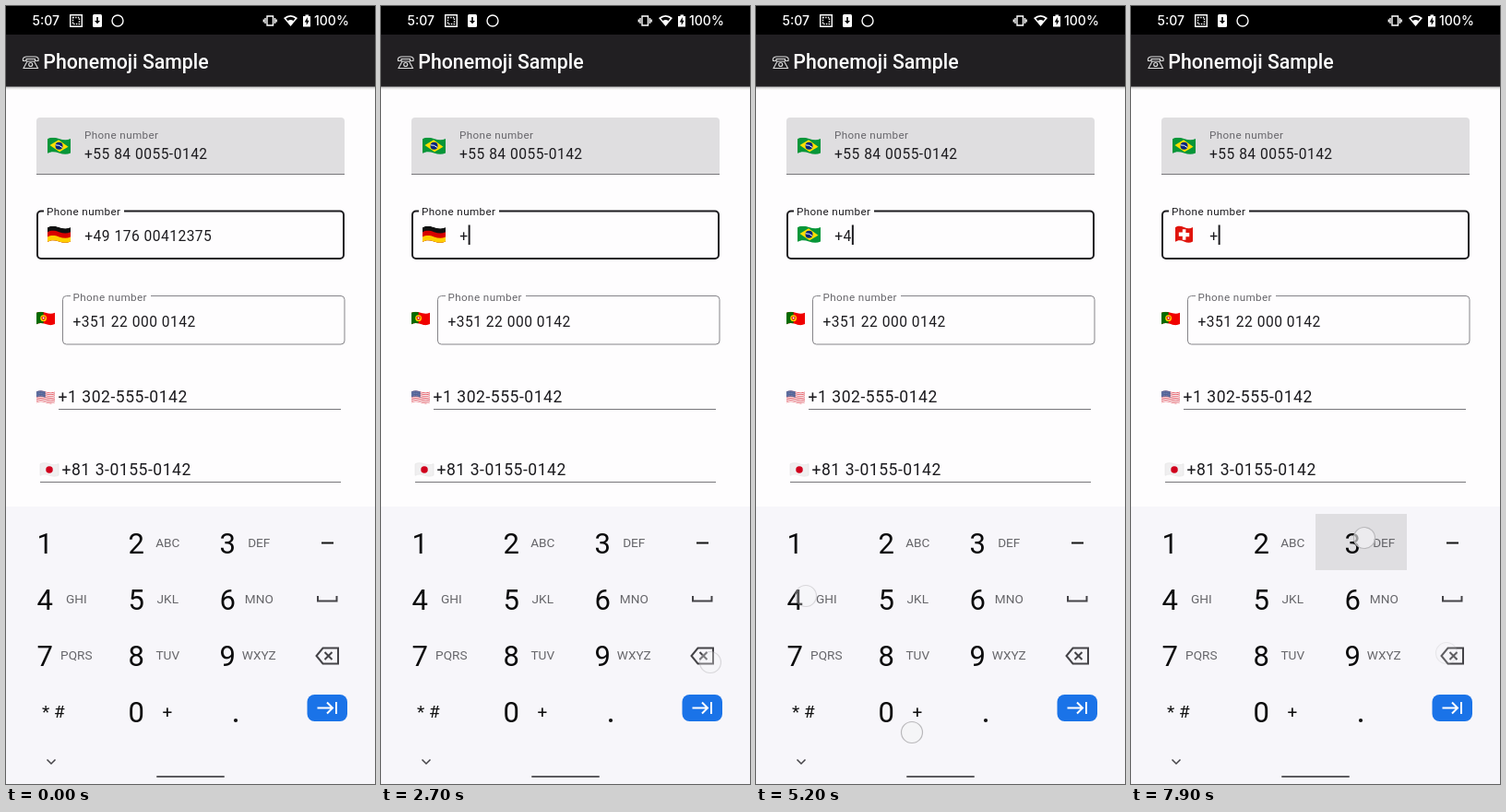
An HTML page for the animation above (8000 ms loop, 400 px wide and 844 px high).

```html
<!DOCTYPE html>
<html lang="en">
<head>
<meta charset="utf-8">
<title>Phonemoji Sample</title>
<style>
html, body { margin: 0; height: 100%; overflow: hidden; background: #fefdfe; }
svg { display: block; width: 400px; height: 844px; font-family: Roboto, sans-serif; fill: #1c1b1f; }
.line { fill: none; stroke: #1c1b1f; }
.status { font: 500 14px Inter, sans-serif; fill: #fff; }
.title { font-size: 21.3px; font-weight: 500; fill: #fff; }
.label { font-size: 11.68px; letter-spacing: .0333em; fill: #66656a; }
.field { font-size: 15.57px; letter-spacing: .03125em; }
.large { font-size: 17.5px; }
.digit { font-size: 31px; text-anchor: middle; fill: #0b0b0c; }
.letters { font-size: 13.6px; text-anchor: middle; fill: #66666a; }
.symbol { font-size: 19px; fill: #111; }
</style>
</head>
<body>
<svg viewBox="0 0 400 844">
  <defs>
    <path id="cloth" d="M0 1.7C4-.6 8 0 12.5 1.5S21 3.4 25 1.5V17C21 19 17 18.6 12.5 17S4 15 0 17.3Z"/>
    <clipPath id="wave"><use href="#cloth"/></clipPath>
    <g id="br" clip-path="url(#wave)">
      <path fill="#079639" d="M0 0H25V20H0Z"/>
      <path fill="#fedf00" d="M2.5 8.6 12 2.8 22.5 10.2 13 15.8Z"/>
      <circle cx="12.5" cy="9.3" r="4" fill="#00247d"/>
      <path class="line" style="stroke:#fff" d="M8.7 8.3Q13 8 16 11"/>
    </g>
    <g id="de" clip-path="url(#wave)">
      <use href="#cloth" fill="#111"/>
      <use href="#cloth" y="5.2" fill="#d80000"/>
      <use href="#cloth" y="10.4" fill="#ffce00"/>
    </g>
    <g id="ro" clip-path="url(#wave)">
      <path fill="#00319c" d="M0 0H9V20H0Z"/>
      <path fill="#ffde00" d="M8.4 0H17V20H8.4Z"/>
      <path fill="#de2110" d="M16.7 0H25V20H16.7Z"/>
    </g>
    <g id="ch" transform="translate(3) scale(.76 1)">
      <use href="#cloth" fill="#e0140c"/>
      <path fill="#fff" d="M10.3 3.8H15V7.4H20V11.8H15V15.3H10.3V11.3H5V7H10.3Z"/>
    </g>
    <g id="pt" clip-path="url(#wave)">
      <path fill="#f00000" d="M0 0H25V20H0Z"/>
      <path fill="#066b00" d="M0 0H9.5V20H0Z"/>
      <circle cx="9.5" cy="9" r="4.2" fill="#ffe000"/>
      <path fill="#e00000" d="M7 6.5H12V9.5Q11.5 11.5 9.5 12Q7.5 11.5 7 9.5Z"/>
      <path fill="#fff" d="M8.4 7.5H10.6V10H8.4Z"/>
    </g>
    <g id="us" clip-path="url(#wave)">
      <use href="#cloth" fill="#e8606a"/>
      <g id="stripes"></g>
      <path fill="#48598f" d="M0 0Q6-1 12 1.5V9.8Q6 7 0 9.2Z"/>
      <path class="line" style="stroke:#c4cbe0" stroke-dasharray="1 1.5" d="M1 3.2Q6 1 11 3.4M1 5.4Q6 3.4 11 5.8M1 7.6Q6 5.6 11 8"/>
    </g>
    <g id="jp">
      <use href="#cloth" fill="#f0eff0" stroke="#ddd" stroke-width=".6"/>
      <circle cx="12.5" cy="9.3" r="4.7" fill="#d0001c"/>
    </g>
    <linearGradient id="shade" x2="0" y2="1"><stop stop-color="#bbb"/><stop offset="1" stop-color="#fefdfe"/></linearGradient>
  </defs>

  <path fill="#fefdfe" d="M0 0H400V844H0Z"/>
  <path fill="url(#shade)" d="M0 87H400V91H0Z"/>
  <path fill="#211f22" d="M0 30H400V87.5H0Z"/>
  <path fill="#000" d="M0 0H400V31H0Z"/>

  <g class="status">
    <text x="28.5" y="21">5:07</text>
    <text x="334" y="21">100%</text>
    <g class="line" style="stroke:#fff" stroke-width="1.4">
      <path d="M69.7 9.7H82.3V22.3H69.7Z"/>
      <path stroke-dasharray="1.4 1.3" d="M72.5 12.5H79.5V19.5H72.5Z"/>
      <circle cx="121" cy="16" r="6"/>
      <path d="M283 11H289.500V21H283ZM281 13V19M291.500 13V19M279.300 14.500V17.500M293.200 14.500V17.500"/>
    </g>
    <path d="M95.500 9H102.500Q104 9 104 10.500V21.500Q104 23 102.500 23H95.500Q94 23 94 21.500V10.500Q94 9 95.500 9Z"/>
    <path fill="#000" d="M98.200 12H99.800V16H102L99 19.300 96 16H98.200Z"/>
    <path d="M301 13Q308.500 7 316 13L308.500 22Z"/>
    <path fill="#000" d="M303.500 13.500Q308.500 10 313.500 13.500L311.500 16Q308.500 14 305.500 16Z"/>
    <path d="M324.500 9.500H328V11H330V22.500H322V11H324.500Z"/>
    <path fill="#000" d="M326.800 12 323.700 17.500H325.700V21L328.600 15.700H326.800Z"/>
  </g>

  <g class="line" style="stroke:#ddd" stroke-width="1.1">
    <path d="M18.500 59.500Q17.500 55.500 22 55H32Q36 55.500 35 59.500H31.500V57.500H22V59.500ZM23 60H30.500L34.500 67.500H19Z"/>
    <circle cx="26.700" cy="63.500" r="2"/>
  </g>
  <text class="title" x="40.300" y="68">Phonemoji Sample</text>

  <path fill="#dfdee0" d="M33 182V125Q33 121 37 121H363Q367 121 367 125V182Z"/>
  <path class="line" style="stroke:#77767a" d="M33 182.500H367M57 437.500H363M37 516.500H363"/>
  <text class="label" x="85" y="144">Phone number</text>
  <text class="field" x="85" y="166">+55 84 0055-0142</text>
  <use href="#br" x="45" y="142.500"/>

  <path class="line" stroke-width="2" d="M41 222.500H38a4 4 0 0 0-4 4V270a4 4 0 0 0 4 4H362a4 4 0 0 0 4-4V226.500a4 4 0 0 0-4-4H128"/>
  <text class="label" x="44" y="227" style="fill:#1c1b1f">Phone number</text>
  <use id="flag" x="45" y="238.500"/>
  <text class="field" id="input" x="85.300" y="255"></text>
  <rect id="caret" y="237.500" width="2" height="21.500"/>

  <path class="line" style="stroke:#858489" d="M70 314.500H65.500a4 4 0 0 0-4 4V363a4 4 0 0 0 4 4H363a4 4 0 0 0 4-4V318.500a4 4 0 0 0-4-4H157"/>
  <text class="label" x="72.500" y="319.500">Phone number</text>
  <text class="field" x="72.500" y="347.500">+351 22 000 0142</text>
  <use href="#pt" transform="translate(33 331.500) scale(.8)"/>

  <text class="field large" x="56.500" y="430">+1 302-555-0142</text>
  <use href="#us" transform="translate(33 417) scale(.8)"/>
  <text class="field large" x="60.500" y="509">+81 3-0155-0142</text>
  <use href="#jp" transform="translate(37 495.500) scale(.8)"/>

  <path fill="#f7f6fa" d="M0 543H400V844H0Z"/>
  <g id="presses" fill="#dfdee1"></g>
  <g id="keys"></g>
  <g class="symbol">
    <text x="39" y="772">* #</text>
    <text x="169.500" y="772">+</text>
    <circle cx="249" cy="775" r="2.100"/>
  </g>
  <g class="line" style="stroke:#444347" stroke-width="2">
    <path stroke="#111" d="M342 582.500H355"/>
    <path d="M338 640V645.500H358.500V640"/>
    <path d="M343.500 696.500H360V713.500H343.500L336.500 705ZM345.500 701 353.500 709M353.500 701 345.500 709"/>
    <path stroke-width="1.500" d="M44.500 817.500 49 822 53.500 817.500"/>
  </g>
  <rect x="326.500" y="747" width="43.500" height="29" rx="8" fill="#1a73e8"/>
  <path class="line" style="stroke:#fff" stroke-width="2" d="M337.500 761.500H353.500M348 755.500 354 761.500 348 767.500M358 755V768"/>
  <rect x="163" y="835" width="74" height="2" rx="1" fill="#5c5b5f"/>
  <g id="touches" fill="#f4f4f5" fill-opacity=".62" stroke="#b9b8bb" stroke-width="1.200"></g>
</svg>
<script>
const byId = id => document.getElementById(id);
const add = (parent, tag, attrs, text = '') => {
  const el = document.createElementNS('http://www.w3.org/2000/svg', tag);
  for (const name in attrs) el.setAttribute(name, attrs[name]);
  el.textContent = text;
  return byId(parent).appendChild(el);
};

for (let i = 0; i < 6; i++) {
  add('stripes', 'path', {
    class: 'line', style: 'stroke:#f6eef0', 'stroke-width': 1.3,
    d: `M0 ${3.6 + i * 2.4}c4-2.3 8-1.7 12.500-.2s8.500 1.900 12.500 0`
  });
}

['', 'ABC', 'DEF', 'GHI', 'JKL', 'MNO', 'PQRS', 'TUV', 'WXYZ'].forEach((letters, i) => {
  const x = 42.3 + i % 3 * 99, y = 593.5 + Math.floor(i / 3) * 61;
  add('keys', 'text', { class: 'digit', x, y }, i + 1);
  add('keys', 'text', { class: 'letters', x: x + 34, y: y - 6.5 }, letters);
});
add('keys', 'text', { class: 'digit', x: 141.3, y: 776.5 }, '0');

// Each touch: finger down, key lit, finger up, x, y
const touches = [
  [1100, 1100, 2400, 358, 706], [2500, 2500, 2700, 357, 712], [3000, 3000, 3200, 357, 710],
  [3700, 3700, 3800, 148, 642], [3900, 3900, 4000, 148, 642],
  [4800, 4800, 4900, 348, 706], [5000, 5000, 5000, 348, 706],
  [5100, 5100, 5200, 54, 640], [5200, 5300, 5400, 169, 788],
  [6400, 6500, 6500, 341, 704], [6600, 6600, 6700, 52, 582],
  [7600, 7600, 7800, 342, 702], [7900, 7900, 8000, 253, 577]
].map(([down, lit, up, x, y]) => ({
  down, lit, up,
  dot: add('touches', 'circle', { cx: x, cy: y, r: 11.5 }),
  key: add('presses', 'rect', {
    x: 2 + 99 * Math.floor((x - 2) / 99), y: 551 + 61 * Math.floor((y - 551) / 61),
    width: 99, height: 61
  })
}));

// Each edit: time, text, flag
const fullNumber = '+49 176 00412375';
const edits = [[-700, fullNumber, 'de']];
const erase = (time, count) =>
  edits.push([time, fullNumber.match(`^\\+( ?\\d){${13 - count}}`)[0], 'de']);
erase(1100, 1);
for (let count = 2; count <= 13; count++) erase(1275 + count * 75, count);
edits.push(
  [2700, '+', 'de'], [3100, '+', 'de'], [3800, '+5', 'de'], [3900, '+55', 'br'],
  [4900, '+5', 'br'], [5000, '+', 'br'], [5100, '+4', 'br'], [5300, '+40', 'ro'],
  [6500, '+4', 'ro'], [6700, '+41', 'ch'], [7700, '+4', 'ch'], [7800, '+', 'ch']);

const input = byId('input'), caret = byId('caret'), flag = byId('flag');

function draw() {
  const time = Math.floor(performance.now() % 8000 / 100) * 100;
  const [since, text, country] = edits.filter(edit => edit[0] <= time).pop();
  input.textContent = text;
  flag.setAttribute('href', '#' + country);
  caret.setAttribute('x', 85.3 + input.getComputedTextLength());
  caret.setAttribute('opacity', (time - since) % 1000 < 500 ? 1 : 0);
  for (const { down, lit, up, dot, key } of touches) {
    const alpha = time < down ? 0 : time < up ? 1 : Math.max(0, .5 - (time - up) / 400);
    dot.setAttribute('opacity', alpha);
    key.setAttribute('opacity', time >= lit && time < up ? 1 : 0);
  }
  requestAnimationFrame(draw);
}
draw();
</script>
</body>
</html>
```
